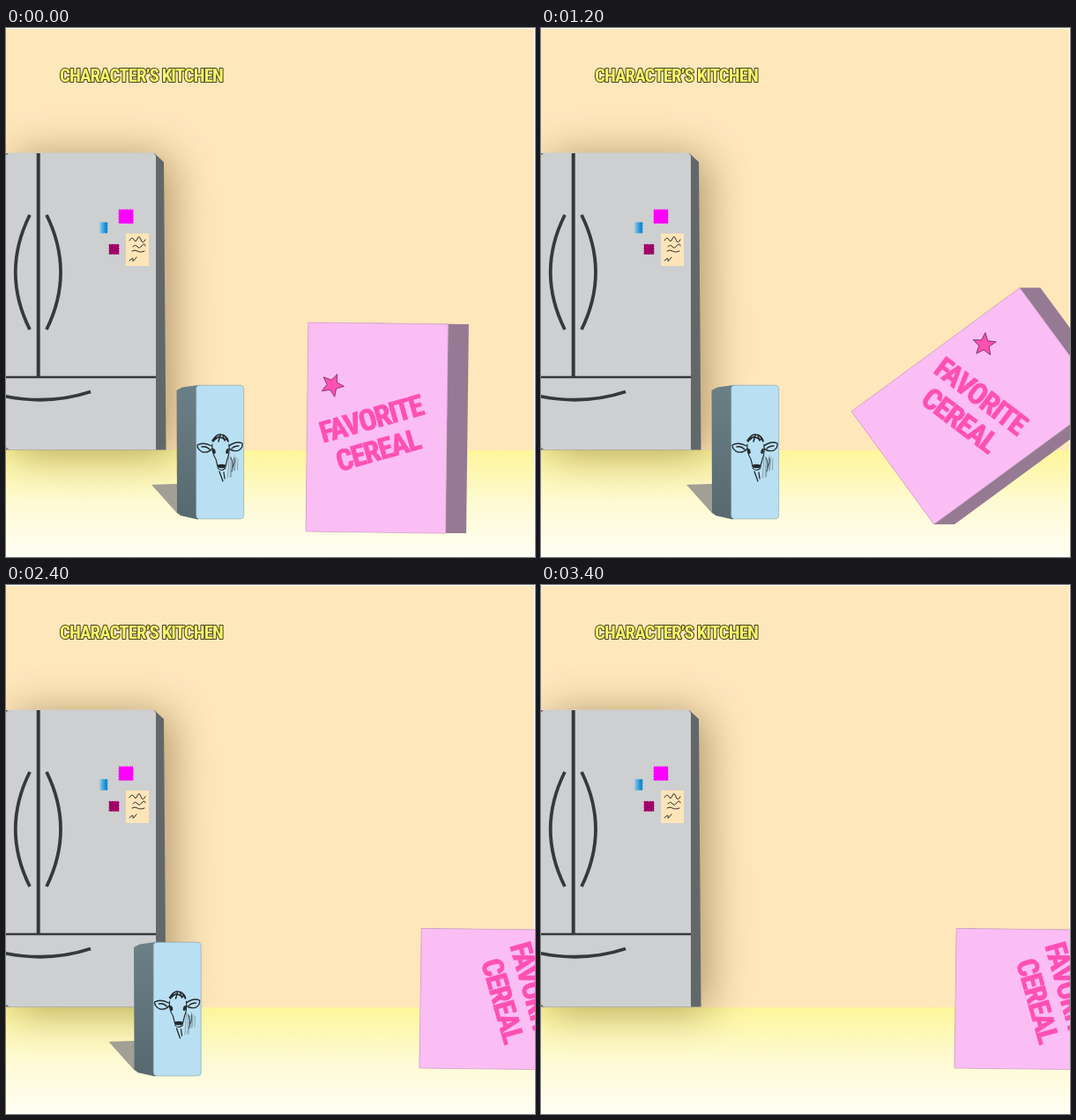
These frames come from a looping animation (600 by 600 pixels, 3.6 s). An HTML page with a canvas:

```html
<!DOCTYPE html>
<html lang="en">
<head>
<meta charset="utf-8">
<title>Character's Kitchen</title>
<style>
html, body { margin: 0; width: 100%; height: 100%; overflow: hidden; background: #ffe7bc; }
canvas { display: block; }
</style>
</head>
<body>
<canvas id="stage" width="600" height="600"></canvas>
<script>
const ctx = document.getElementById('stage').getContext('2d');
const STEP = 200, STEPS = 18;
const INK = '#35393c';

// Cereal box: bottom-left corner and tilt in degrees, one pose per step.
const boxPoses = [
  [340, 571, 0.7], [337, 564.5, 3.5], [331, 549, 5.1], [339.5, 543.3, 10],
  [322, 531, 16.6], [347, 491, 34.5], [352, 435, 53.7], [421, 402, 75],
  [462.5, 397, 88.9], [465, 399, 89.5], [471, 389.5, 90.7]
];
const BOX = { w: 158.5, h: 237, depth: 23.5 };

// Milk carton slide, starting at MILK_START.
const MILK_START = 10;
const milkSlide = [-12, -24.5, -48.5, -110, -132.5, -170, -250, -340];

const rad = deg => deg * Math.PI / 180;

function poly(points, fill, stroke, width = 1) {
  ctx.beginPath();
  points.forEach(([x, y]) => ctx.lineTo(x, y));
  ctx.closePath();
  ctx.fillStyle = fill;
  ctx.fill();
  if (stroke) { ctx.strokeStyle = stroke; ctx.lineWidth = width; ctx.stroke(); }
}

function line(d, width, color = INK) {
  ctx.strokeStyle = color;
  ctx.lineWidth = width;
  ctx.stroke(new Path2D(d));
}

function blob(x, y, rx, ry, turn, fill) {
  ctx.beginPath();
  ctx.ellipse(x, y, rx, ry, rad(turn), 0, 7);
  ctx.fillStyle = fill;
  ctx.fill();
}

function roundRect(x, y, w, h, r, fill, stroke) {
  ctx.beginPath();
  ctx.roundRect(x, y, w, h, r);
  ctx.fillStyle = fill;
  ctx.fill();
  if (stroke) { ctx.strokeStyle = stroke; ctx.lineWidth = 0.6; ctx.stroke(); }
}

function gradient(x0, y0, x1, y1, ...colors) {
  const g = ctx.createLinearGradient(x0, y0, x1, y1);
  colors.forEach((c, i) => g.addColorStop(i / (colors.length - 1), c));
  return g;
}

// Tight bold face, no larger than `size` and no wider than `room`.
function setFont(text, size, room) {
  const apply = px => {
    ctx.font = `bold condensed ${px}px "Roboto Condensed", Roboto, sans-serif`;
    ctx.letterSpacing = `${-0.045 * px}px`;
  };
  apply(size);
  const fitted = Math.min(size, size * room / ctx.measureText(text).width);
  apply(fitted);
  return fitted;
}

function drawRoom() {
  ctx.fillStyle = '#ffe7bc';
  ctx.fillRect(0, 0, 600, 600);
  ctx.fillStyle = gradient(0, 479, 0, 600, '#fdf69a', '#fefad4', '#fffef4');
  ctx.fillRect(0, 479, 600, 121);
  ctx.fillStyle = '#fff';
  ctx.fillRect(0, 0, 600, 1);
  ctx.fillRect(599, 0, 1, 600);
}

function drawTitle() {
  const title = 'CHARACTER’S KITCHEN';
  setFont(title, 24, 185);
  ctx.textAlign = 'left';
  ctx.lineJoin = 'round';
  ctx.lineWidth = 2;
  ctx.strokeStyle = '#45451c';
  ctx.strokeText(title, 61, 61);
  ctx.fillStyle = '#f8f56c';
  ctx.fillText(title, 61, 61);
}

function stamp(x, y, w, h, fill) {
  ctx.fillStyle = fill;
  ctx.fillRect(x, y, w, h);
  ctx.setLineDash([1.5, 1.5]);
  ctx.strokeStyle = fill;
  ctx.lineWidth = 1;
  ctx.strokeRect(x, y, w, h);
  ctx.setLineDash([]);
}

function drawFridge() {
  ctx.save();
  ctx.shadowColor = 'rgba(95, 65, 20, 0.5)';
  ctx.shadowBlur = 50;
  ctx.shadowOffsetX = 9;
  ctx.shadowOffsetY = 3;
  poly([[0, 142], [168, 142], [179, 152], [181.5, 478.5], [0, 478.5]], '#62686a');
  ctx.restore();

  roundRect(-0.5, 141.5, 170.5, 337, [6, 5, 0, 6], '#cdcfd1');

  ctx.lineCap = 'butt';
  line('M36.7 142V396', 4);
  line('M0 396H170', 2.4);
  line('M27 212Q-5.5 277 27 342M46 212Q78 277 46 342', 3.8);
  line('M-2 417.5Q49 428 96 412.5', 3.8);

  stamp(128, 206, 16, 15.5, '#ff00ff');
  stamp(106.5, 220.5, 8.5, 12, gradient(106, 0, 113, 0, '#8fcdec', '#1489d2'));
  stamp(117, 245.5, 11, 11, '#a00068');

  ctx.fillStyle = '#fee5b9';
  ctx.fillRect(136, 233, 26, 37);
  ctx.lineCap = 'round';
  line('M140 241q3-5 5-1t4-1t4 1t5 0M144 248q3-3 5 0t5-1t4 0M143 253q3-2 6 0t8 0M140 264q5-5 4-1t4-3', 1, '#2d2a26');
}

function drawCow() {
  const dark = '#23282b';
  ctx.lineCap = ctx.lineJoin = 'round';
  // ears
  line('M233 474Q224 469 217 473Q217 478 223 481Q230 482 234 477', 1.3, dark);
  line('M253 474Q261 468 268 471Q269 476 264 479Q257 481 253 477', 1.3, dark);
  line('M222 475Q227 474 231 478M264 474Q259 474 256 477', 1.4, dark);
  // forelock and face
  line('M234 468Q239 460 244 461Q250 462 252 468M237 467q4-4 6-3t6 3M238 464l-3 5M243 462l-2 7M246 462l2 6M249 464l3 5', 1.5, dark);
  line('M234 472Q233 481 238 489L240 497M253 472Q254 482 251 489L249 497', 1.1, dark);
  blob(236, 480, 1.6, 3, -15, dark);
  blob(251, 480, 1.6, 3, 15, dark);
  // muzzle
  blob(244.5, 497, 5, 2.2, 0, dark);
  line('M240 499Q244 504 249 499', 1.1, dark);
  // throat and shading
  line('M242 503l4 11M247 504l1 7', 1.3, dark);
  for (let i = 0; i < 6; i++) {
    const x = 253 + i * 2;
    line(`M${x} ${485 + i % 3 * 2}l${-1.5 + i % 2} ${25 - i * 2.6}`, 0.5, '#56656c');
  }
  line('M255 487q4 8 1 16M259 488q1 6-2 10', 0.8, dark);
}

function drawMilk(dx) {
  ctx.save();
  ctx.translate(dx, 0);
  poly([[165, 518], [195, 517], [195, 551.5]], '#a29f96');
  poly([[218, 405], [200, 407.5], [193.5, 411], [194, 549.5], [198, 553], [218, 557.5]],
    gradient(0, 405, 0, 557, '#6b7f87', '#57696f'));
  roundRect(215.7, 405.2, 54, 151.6, 4, '#b9e0f2', '#849fac');
  drawCow();
  ctx.restore();
}

function drawLabel() {
  const pink = '#ff50b4';
  const star = Array.from({ length: 10 }, (_, i) => {
    const a = rad(23.5 + i * 36), r = i % 2 ? 6 : 13.5;
    return [28 + r * Math.sin(a), -166.4 - r * Math.cos(a)];
  });
  ctx.lineJoin = 'miter';
  poly(star, pink, '#7d3563', 0.9);

  const size = setFont('FAVORITE', 35, 120);
  ctx.textAlign = 'center';
  ctx.lineJoin = 'round';
  ctx.fillStyle = ctx.strokeStyle = pink;
  ctx.lineWidth = 0.8;
  [['FAVORITE', 72.4, -128.9], ['CEREAL', 80.5, -93.5]].forEach(([word, x, y]) => {
    ctx.save();
    ctx.translate(x, y);
    ctx.rotate(rad(-16.5));
    ctx.fillText(word, 0, size * 0.357);
    ctx.strokeText(word, 0, size * 0.357);
    ctx.restore();
  });
}

function drawBox([x, y, tilt]) {
  const s = Math.sin(rad(tilt)), c = Math.cos(rad(tilt));
  const { w, h, depth } = BOX;
  const place = (u, v) => [x + u * c - v * s, y + u * s + v * c];
  const front = [place(0, 0), place(0, -h), place(w, -h), place(w, 0)];
  const back = front.map(([px, py]) => [px + depth, py]);
  const side = '#967a93';
  ctx.lineJoin = 'round';
  front.forEach((p, i) => {
    const j = (i + 1) % 4;
    poly([p, front[j], back[j], back[i]], side);
  });
  poly(front, '#fabdf4', '#c9a0c4', 0.6);

  ctx.save();
  ctx.translate(x, y);
  ctx.rotate(rad(tilt));
  drawLabel();
  ctx.restore();
}

function draw(step) {
  drawRoom();
  drawTitle();
  drawFridge();
  drawMilk(step < MILK_START ? 0 : milkSlide[step - MILK_START]);
  drawBox(boxPoses[Math.min(step, boxPoses.length - 1)]);
}

let shown = -1;
function tick(now) {
  const step = Math.floor(Math.max(now, 0) / STEP) % STEPS;
  if (step !== shown) draw(shown = step);
  requestAnimationFrame(tick);
}
tick(0);
</script>
</body>
</html>
```
